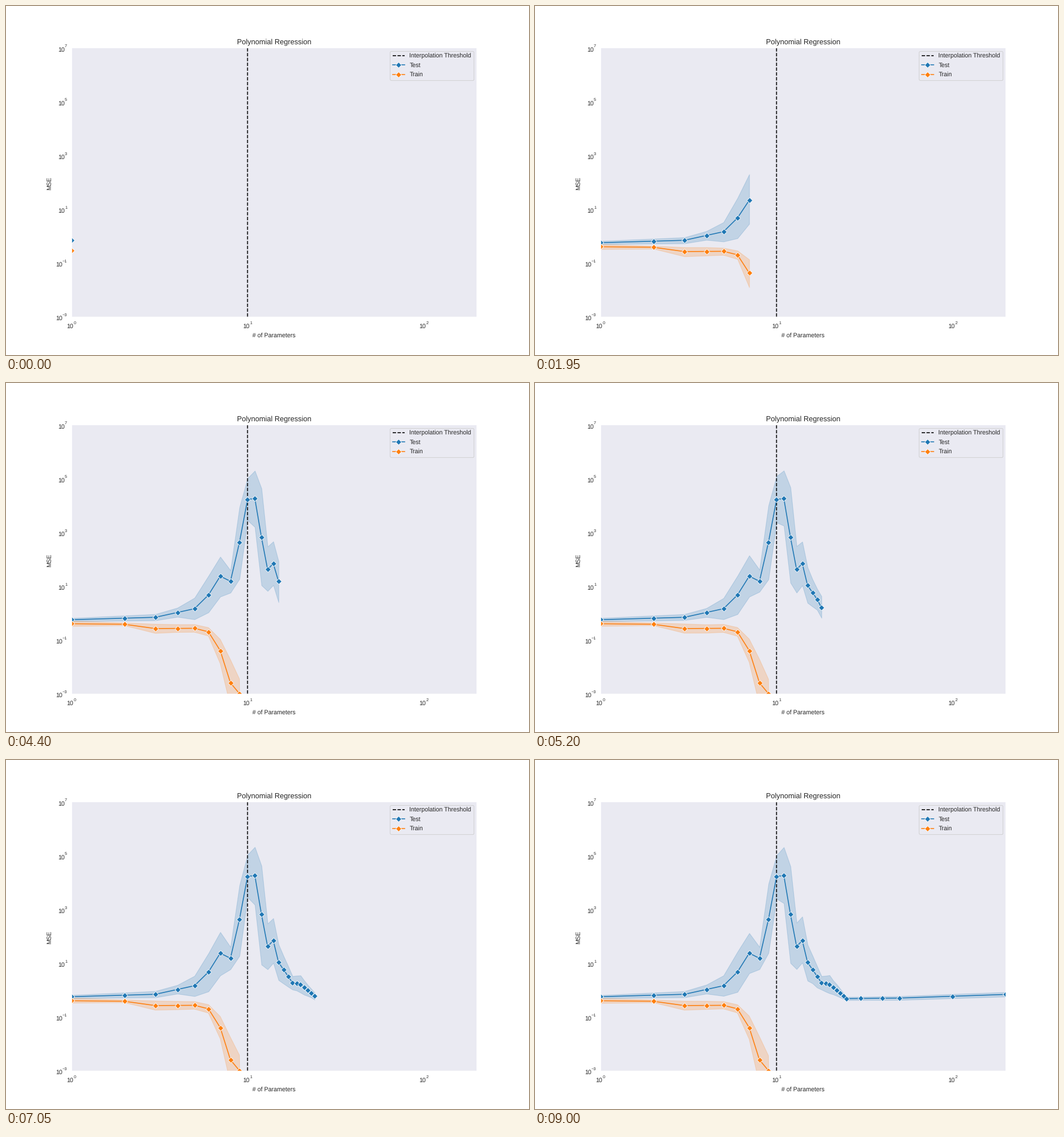
Animation, 917 px wide and 611 px high, one loop 9.05 s. Source, as a matplotlib script:

```python
import numpy as np
import matplotlib.pyplot as plt
from matplotlib.animation import FuncAnimation
from matplotlib.transforms import IdentityTransform

W, H = 917, 611
DPI = W / 12
INK = "0.15"
RUNS = 6          # repeated fits per model size
SIZES = np.array([*range(1, 26), 30, 40, 50, 100, 200])

# how the repeated fits scatter around their mean, in standard deviations
SCATTER = np.array([1.18, -.35, -1.5, .5, 1.05, -.88])

# key points: model size, log10 of the mean error, reach of the band
TEST = [(1, -.25, .06), (3, -.16, .115), (4, .02, .165), (5, .16, .38),
        (6, .67, .73), (7, 1.37, .755), (8, 1.18, .41), (9, 2.63, 1.31),
        (10, 4.22, .81), (11, 4.265, 1.05), (12, 2.81, 1.8), (13, 1.62, .86),
        (14, 1.84, .85), (15, 1.03, .66), (18, .27, .26), (20, .215, .32),
        (25, -.32, .06), (50, -.30, .07), (200, -.165, .085)]
TRAIN = [(1, -.40, .095), (2, -.42, .05), (3, -.58, .17), (5, -.57, .14),
         (6, -.70, .155), (7, -1.4, .43), (8, -2.6, .85), (9, -3, .55),
         (10, -26, .5), (200, -26, .5)]

plt.rcParams.update({
    "font.family": "Liberation Sans",
    "text.hinting": "none",
    "text.color": INK,
    "axes.facecolor": "#EAEAF2",
    "axes.edgecolor": "white",
})


class Curve:
    def __init__(self, ax, label, color, keys, sign):
        at, level, reach = np.array(keys, float).T
        self.mean = np.interp(np.log(SIZES), np.log(at), level)
        self.reach = np.interp(np.log(SIZES), np.log(at), reach)
        self.runs = sign * 1.25 * SCATTER
        self.ax, self.color, self.seed = ax, color, 2 + sign
        self.line, = ax.plot([], [], color=color, marker="D", label=label,
                             markeredgecolor="w", markeredgewidth=.75)
        self.line.set_snap(False)
        self.band = None

    def show(self, k):
        full, extra = divmod(min(k + 1, RUNS * len(SIZES)), RUNS)
        n = full + (extra > 0)
        mean = self.mean[:n].copy()
        up, down = self.reach[:n].copy(), self.reach[:n].copy()
        if extra:
            # the newest size has only some of its runs yet
            part = self.runs[:extra]
            mid = part.mean()
            grow = part.std() / self.runs.std() * np.sqrt(RUNS / extra)
            mean[-1] += mid * self.reach[n - 1]
            up[-1] *= min(grow, part.max() - mid)
            down[-1] *= min(grow, mid - part.min())
        self.line.set_data(SIZES[:n], 10 ** mean)

        if self.band is not None:
            self.band.remove()
            self.band = None
        n -= extra == 1        # one run alone has no band
        if n:
            # resampled every time, so the edges tremble
            rng = np.random.default_rng([k, self.seed])
            wobble = 1 + .035 * rng.normal(size=(2, len(SIZES)))[:, :n]
            self.band = self.ax.fill_between(
                SIZES[:n], 10 ** (mean[:n] - down[:n] * wobble[0]),
                10 ** (mean[:n] + up[:n] * wobble[1]), color=self.color, alpha=.2)


fig, ax = plt.subplots(figsize=((W + .01) / DPI, (H + .01) / DPI), dpi=DPI)
fig.subplots_adjust(left=.125, right=.9, bottom=.11, top=.88)
ax.set(xscale="log", yscale="log", xlim=(1, 200), ylim=(1e-3, 1e7),
       title="Polynomial Regression")
ax.minorticks_off()
ax.tick_params(bottom=False, left=False, labelbottom=False, labelleft=False)
ax.autoscale(False)


def put(x, y, text, size=10, **kw):
    """Text with its baseline at pixel x, y, counted from the top left."""
    fig.text(x, H - y, text, fontsize=size, va="baseline",
             transform=IdentityTransform(), **kw)


def power(x, y, exp):
    put(x, y, "10")
    put(x + 11.9, y - 7.4, str(exp).replace("-", "\u2212"), 7)


def pixel(x, y):
    px, py = ax.transData.transform((x, y))
    return px, H - py


for e in range(3):
    x, y = pixel(10.0 ** e, 1e-3)
    power(x - 8, y + 20.5, e)
for e in range(-3, 8, 2):
    x, y = pixel(1, 10.0 ** e)
    power(x - (27.8 if e < 0 else 23.5), y + 6.4, e)
put(470, 580.5, "# of Parameters", ha="center")
put(78.7, 310, "MSE", rotation=90, rotation_mode="anchor", ha="center")

ax.axvline(10, color="black", linestyle="--", snap=False,
           label="Interpolation Threshold")
curves = [Curve(ax, "Test", "tab:blue", TEST, 1),
          Curve(ax, "Train", "tab:orange", TRAIN, -1)]
ax.legend(loc="upper right", labelspacing=.57)


def update(k):
    for curve in curves:
        curve.show(k)
    return []


anim = FuncAnimation(fig, update, frames=181, interval=50,
                     init_func=lambda: [], repeat=True, repeat_delay=0)
plt.show()
```
